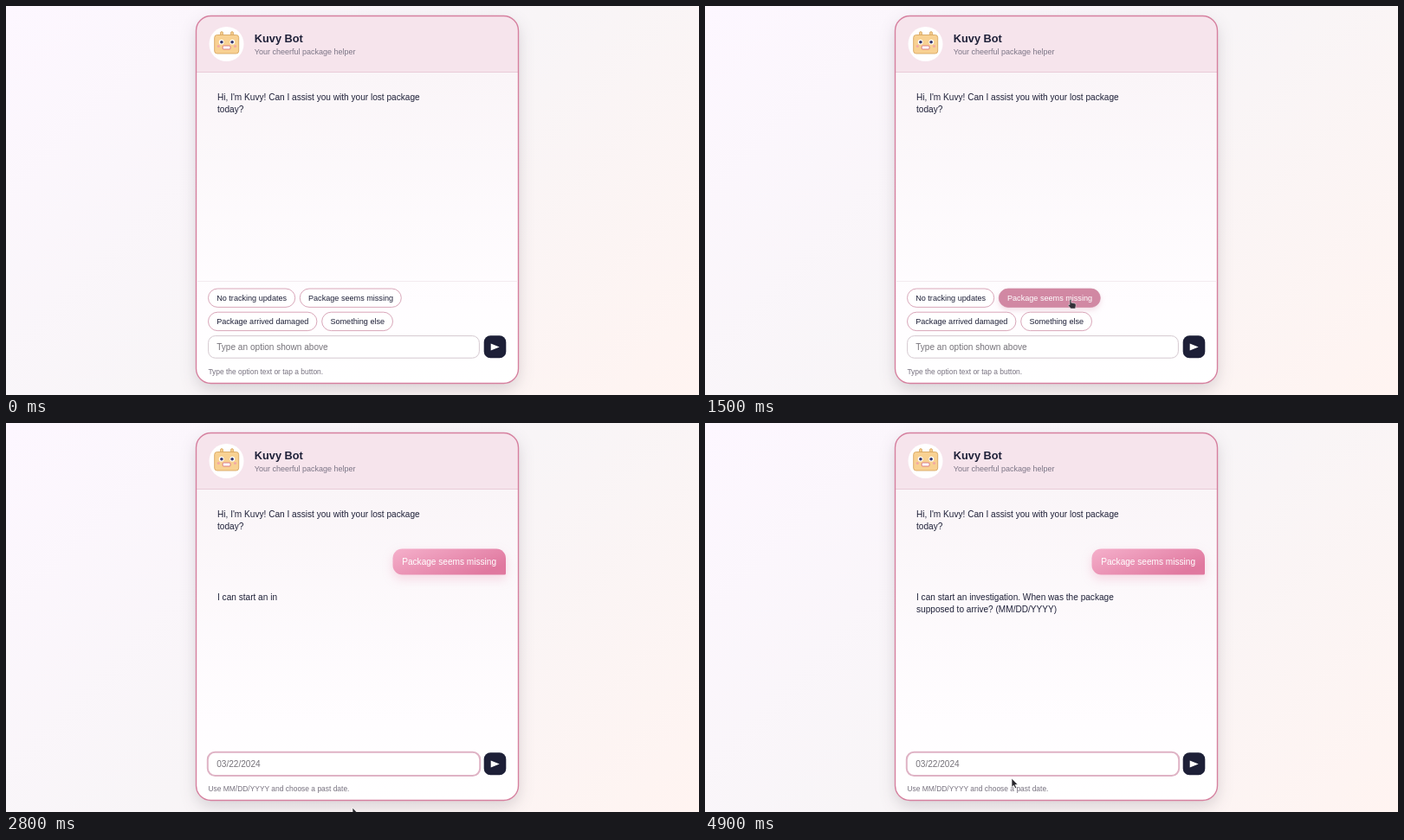
An HTML page that plays this animation: 800 px wide and 450 px high, repeating every 5000 ms.

```html
<!DOCTYPE html>
<html lang="en">
<head>
<meta charset="utf-8">
<title>Package chat</title>
<style>
html, body { margin: 0; width: 100%; height: 100%; overflow: hidden; }
body { background: linear-gradient(135deg, #fdf7ff, #f8f5f7 50%, #fff4f1); }
svg { display: block; width: 800px; height: 450px; font: 10.1px "Liberation Sans", Arial, sans-serif; fill: #1e2038; }
text { white-space: pre; }
.card { filter: drop-shadow(0 7px 9px rgba(50, 35, 55, .17)); }
.title { font-size: 12.75px; font-weight: bold; }
.sub { font-size: 9px; fill: #7b7485; }
.hint { font-size: 8.45px; fill: #77717f; }
.place { fill: #757279; }
.chip text { font-size: 9.1px; }
.chip .edge { fill: #fff; stroke: #d9a6b9; }
.chip .tint { fill: #d188a3; filter: drop-shadow(0 3px 3px rgba(209, 136, 163, .3)); }
.mine rect, .mine path { filter: drop-shadow(0 5px 6px rgba(228, 120, 160, .25)); }
</style>
</head>
<body>
<svg viewBox="0 0 800 450">
  <defs>
    <linearGradient id="pane" x2="0" y2="1"><stop stop-color="#faf5f8"/><stop offset=".75" stop-color="#fffdff"/><stop offset="1" stop-color="#fff"/></linearGradient>
    <linearGradient id="pink" x2="1" y2=".6"><stop stop-color="#f5b0cb"/><stop offset="1" stop-color="#e0789f"/></linearGradient>
    <clipPath id="clip"><rect x="219.5" y="11.5" width="372" height="425" rx="17"/></clipPath>
  </defs>

  <rect class="card" x="219.5" y="11.5" width="372" height="425" rx="17" fill="#fff"/>
  <g clip-path="url(#clip)">
    <rect x="219" y="76" width="373" height="361" fill="url(#pane)"/>
    <rect x="219" y="11" width="373" height="65.5" fill="#f6e4ec"/>
    <rect x="219" y="76" width="373" height="1" fill="#e9cbd8"/>
  </g>
  <rect x="219.5" y="11.5" width="372" height="425" rx="17" fill="none" stroke="#d6809f" stroke-width="1.4"/>

  <circle cx="254.5" cy="44" r="20" fill="#fff"/>
  <g stroke="#d9a863" stroke-width=".9" fill="#f8d192">
    <rect x="247.6" y="29.7" width="2.8" height="5" rx="1.3"/>
    <rect x="259.6" y="29.7" width="2.8" height="5" rx="1.3"/>
    <rect x="240.7" y="33.5" width="28" height="21.5" rx="3"/>
  </g>
  <g fill="#fff"><circle cx="248.7" cy="41.7" r="2.9"/><circle cx="261.3" cy="41.7" r="2.9"/></g>
  <g fill="#33346b"><circle cx="248.9" cy="41.7" r="1.8"/><circle cx="261.1" cy="41.7" r="1.8"/></g>
  <g fill="#f3a9a5"><circle cx="245.3" cy="46.5" r="1.6"/><circle cx="264.5" cy="46.5" r="1.6"/></g>
  <rect x="250.2" y="46" width="8.8" height="4" rx="1" fill="#fff" stroke="#d9707c" stroke-width=".9"/>

  <text class="title" x="286.8" y="42.2">Kuvy Bot</text>
  <text class="sub" x="286.8" y="56.2">Your cheerful package helper</text>
  <text x="244" y="108.7">Hi, I'm Kuvy! Can I assist you with your lost package</text>
  <text x="244" y="122.7">today?</text>

  <g class="mine" id="mine">
    <path d="M457.5 145.5H566a11 11 0 0 1 11 11V174a1.5 1.5 0 0 1-1.5 1.5H457.5a11 11 0 0 1-11-11V156.500a11 11 0 0 1 11-11Z" fill="url(#pink)"/>
    <text x="457.2" y="164.2" fill="#fff">Package seems missing</text>
  </g>
  <text id="line0" x="244" y="204.7"></text>
  <text id="line1" x="244" y="218.7"></text>

  <g id="footer">
    <g id="chips"><rect x="220.3" y="318" width="370.400" height="1" fill="#f3ebef"/></g>
    <rect id="field" fill="#fff"/>
    <text id="place" class="place" x="243.2" y="398"></text>
    <rect id="caret" x="243" y="388.500" width="1" height="12" fill="#1e2038"/>
    <rect x="551.7" y="381.3" width="25.6" height="25.900" rx="7.5" fill="#1d1f37"/>
    <path d="M559.7 390.400L569.700 394.5L559.700 398.600Z" fill="#fff"/>
  </g>
  <text id="hint" class="hint" x="233.4" y="425.800"></text>

  <g id="pointer" stroke-linejoin="round">
    <path id="arrow" d="M0 0V10.300L2.400 8.200L4 11.700L5.700 10.900L4.100 7.500H7.200Z" fill="#27262b" stroke="#fff" stroke-width=".7"/>
    <path id="hand" d="M0 .8Q1 -.4 1.800 .8V4.200L6 5Q7.300 5.400 7.200 7L6.500 11H1.300L-1.800 7.200Q-1.600 5.800 0 6.800Z" fill="#333038" stroke="#eee" stroke-width=".5"/>
    <path id="beam" d="M-2 -5.500Q0 -5.500 0 -4.200Q0 -5.500 2 -5.500M0 -4.200V4.200M-2 5.500Q0 5.500 0 4.200Q0 5.500 2 5.500" fill="none" stroke="#45434a"/>
  </g>
</svg>
<script>
const LOOP = 5000, CLICK = 1900, REPLY = 2380, CHAR_MS = 24.5;
const LINES = [
  "I can start an investigation. When was the package ",
  "supposed to arrive? (MM/DD/YYYY)"
];
// time, x, y of the pointer's hot spot
const PATH = [
  [700, 600, 470], [1000, 466, 375], [1500, 421, 339], [CLICK, 421, 339],
  [2100, 448, 395], [2300, 452, 400], [2800, 400, 445], [3000, 380, 420],
  [3200, 330, 393], [4200, 330, 393], [4900, 354, 411], [LOOP, 354, 411]
];
const $ = id => document.getElementById(id);
const clamp = v => Math.max(0, Math.min(1, v));
const show = (el, on) => el.style.display = on ? "" : "none";
const set = (el, attrs) => { for (const k in attrs) el.setAttribute(k, attrs[k]); };

function add(parent, tag, attrs, label = "") {
  const el = document.createElementNS("http://www.w3.org/2000/svg", tag);
  set(el, attrs);
  el.textContent = label;
  return parent.appendChild(el);
}

function makeChip(x, y, width, label) {
  const g = add($("chips"), "g", { class: "chip" });
  const box = { x, y, width, height: 21.4, rx: 10.7 };
  add(g, "rect", { class: "edge", ...box });
  const tint = add(g, "rect", { class: "tint", ...box });
  const text = add(g, "text", { x: x + 9.7, y: y + 14 }, label);
  return (tone, white) => {
    tint.style.opacity = tone;
    text.style.fill = `color-mix(in srgb, #fff ${white * 100}%, #1e2038)`;
  };
}
const chips = [
  makeChip(233.5, 327, 100.2, "No tracking updates"),
  makeChip(339.3, 327, 117, "Package seems missing"),
  makeChip(233.5, 354.2, 125.4, "Package arrived damaged"),
  makeChip(364.7, 354.2, 81.8, "Something else")
];

function pointerAt(t) {
  const i = Math.max(1, PATH.findIndex(p => p[0] > t));
  const [t0, x0, y0] = PATH[i - 1], [t1, x1, y1] = PATH[i];
  const u = clamp((t - t0) / (t1 - t0)), e = u * u * (3 - 2 * u);
  return [x0 + (x1 - x0) * e, y0 + (y1 - y0) * e];
}

function draw(t) {
  const asking = t >= REPLY, shift = t >= CLICK && !asking ? 4.8 : 0;

  const pop = clamp((t - CLICK) / 120);
  $("mine").style.opacity = pop;
  $("mine").setAttribute("transform", `translate(0 ${4 * (1 - pop)})`);

  const typed = Math.max(0, Math.floor((t - REPLY) / CHAR_MS));
  $("line0").textContent = LINES[0].slice(0, typed);
  $("line1").textContent = LINES[1].slice(0, Math.max(0, typed - LINES[0].length));

  const hover = clamp((t - 1330) / 150);
  const passing = clamp(1 - Math.abs(t - 2040) / 150) * .4;
  chips.forEach((paint, i) => paint(i == 1 ? hover : i == 3 ? passing : 0, i == 1 ? hover : passing * (i == 3)));
  show($("chips"), !asking);
  $("footer").setAttribute("transform", `translate(0 ${shift})`);

  set($("field"), asking
    ? { x: 232.8, y: 380.8, width: 314.4, height: 27.2, rx: 8.5, stroke: "#dfb3c5", "stroke-width": 2 }
    : { x: 233.6, y: 381.6, width: 312.8, height: 25.6, rx: 8, stroke: "#d5c9d0", "stroke-width": 1 });
  $("place").textContent = asking ? "03/22/2024" : "Type an option shown above";
  $("hint").textContent = asking ? "Use MM/DD/YYYY and choose a past date."
    : shift ? "" : "Type the option text or tap a button.";
  show($("caret"), asking && t % 1000 < 500);

  const [x, y] = pointerAt(t);
  const onField = x > 233 && x < 547 && y > 381 + shift && y < 408 + shift;
  const onChip = !asking && (y > 327 + shift && y < 348 + shift && x < 456
    || y > 354 + shift && y < 376 + shift && x < 446);
  show($("pointer"), t >= PATH[0][0]);
  $("pointer").setAttribute("transform", `translate(${x} ${y})`);
  show($("beam"), onField);
  show($("hand"), onChip);
  show($("arrow"), !onField && !onChip);
}

const start = performance.now();
function tick() {
  draw((performance.now() - start) % LOOP);
  requestAnimationFrame(tick);
}
tick();
</script>
</body>
</html>
```
